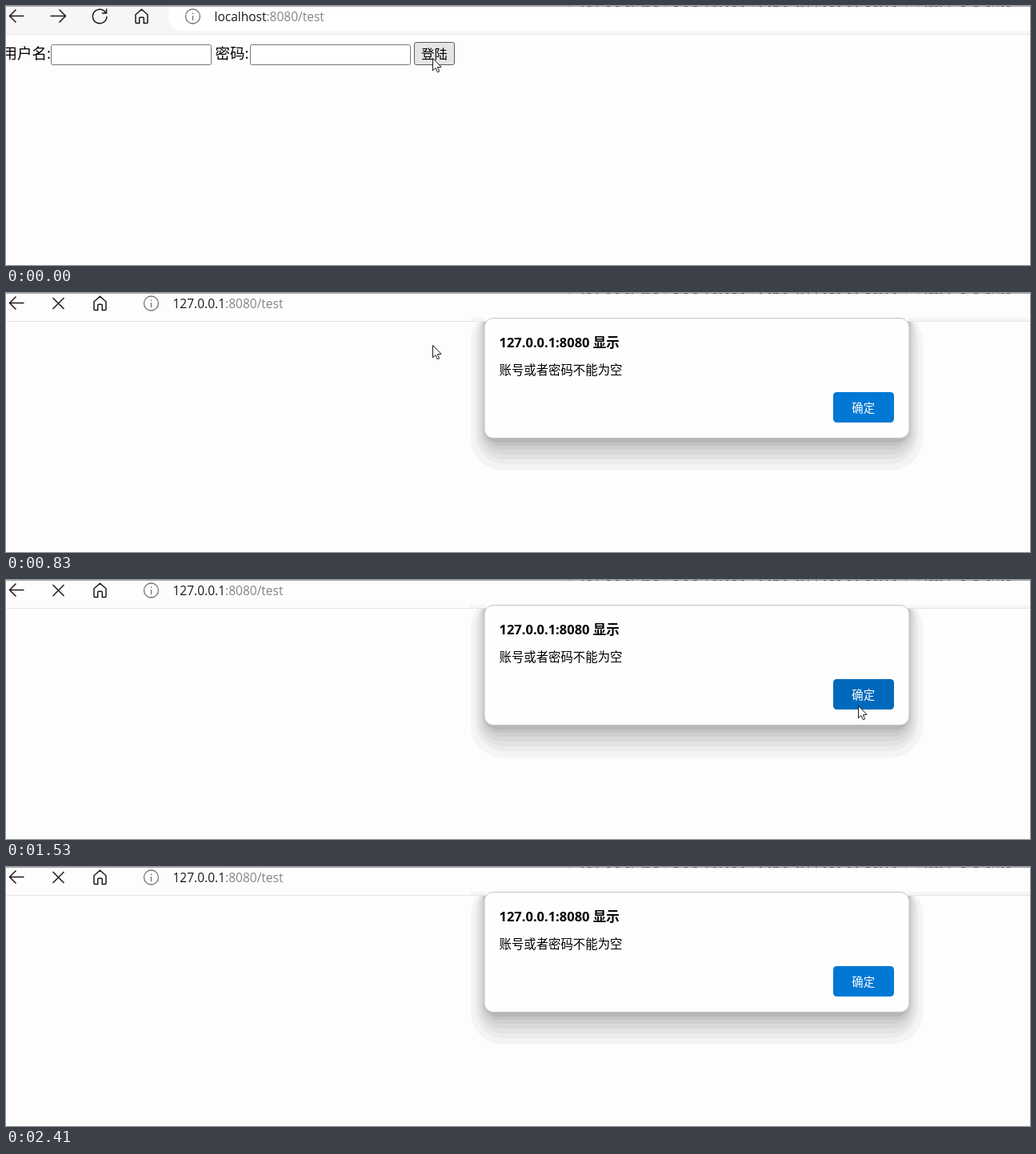
An HTML page for the animation above (2.84 s loop, 1280 by 324 pixels).

```html
<!DOCTYPE html>
<html lang="zh-CN">
<head>
<meta charset="utf-8">
<title>Login test</title>
<style>
html, body { margin: 0; width: 100%; height: 100%; overflow: hidden; background: #fdfdfd; }
svg { display: block; width: 100vw; height: 100vh; }
text { font-family: "Open Sans", "Noto Sans CJK SC", "Noto Sans CJK", sans-serif; white-space: pre; }
.icon { fill: none; stroke: #1b1b1b; stroke-width: 1.5; }
.thin { fill: none; stroke: #727272; stroke-width: 1.3; }
.url { font-size: 15.5px; fill: #858585; }
.url tspan { fill: #1a1a1a; }
.label { font-size: 18.5px; }
.title { font-size: 16.5px; font-weight: 700; }
.message { font-size: 15.4px; }
.ok { font-size: 14.4px; fill: #fff; }
.field { fill: #fff; stroke: #767676; }
</style>
</head>
<body>
<svg viewBox="0 0 1280 324" preserveAspectRatio="none">
  <defs>
    <path id="back" class="icon" d="M22.5 12.5H4.5M12.5 4.5l-8 8 8 8"/>
    <path id="stop" class="icon" d="M-7 -7L7 7M7 -7L-7 7"/>
    <path id="home" class="icon" d="M-7.5 -2.2L0 -8.8L7.5 -2.2V7.5Q7.5 8.5 6.5 8.5H2.8V2.2Q2.8 1.2 1.8 1.2H-1.8Q-2.8 1.2 -2.8 2.2V8.5H-6.5Q-7.5 8.5 -7.5 7.5Z"/>
    <g id="info">
      <circle class="thin" r="9"/>
      <path class="thin" d="M0 -1V5M0 -4.6V-3"/>
    </g>
    <clipPath id="page"><rect y="36" width="1280" height="288"/></clipPath>
    <clipPath id="below"><rect y="31" width="1280" height="293"/></clipPath>
  </defs>

  <rect width="1280" height="324" fill="#fdfdfd"/>

  <g id="login">
    <rect width="1280" height="35" fill="#f6f6f6"/>
    <path d="M1280 0H203V13Q204 31 222 31H1280Z" fill="#fff"/>
    <rect y="35" width="1280" height="1" fill="#e6e6e6"/>
    <path class="icon" d="M55.5 12.5H74.5M66.5 4.5l8 8-8 8"/>
    <path id="reload" class="icon" d="M124.6 8.2A8.8 8.8 0 1 0 126 13M125.6 3.5V9H120"/>
    <use id="cancel" href="#stop" x="117.5" y="13"/>
    <use href="#home" x="169.5" y="13"/>
    <use href="#info" x="233.5" y="13"/>
    <text class="url" x="260.5" y="18.7"><tspan>localhost</tspan>:8080/test</text>
    <text class="label" x="-4.6" y="65.5">用户名:</text>
    <rect class="field" x="56.5" y="48.5" width="200" height="25" rx="2"/>
    <text class="label" x="261.5" y="65.5">密码:</text>
    <rect class="field" x="305.5" y="48.5" width="200" height="25" rx="2"/>
    <rect x="510.5" y="45.5" width="50" height="28" rx="2.5" fill="#e5e5e5" stroke="#5c5c5c"/>
    <text x="519" y="66" font-size="16.4">登陆</text>
  </g>

  <g id="alert">
    <rect x="1128" y="31" width="152" height="4" fill="#f5f5f5"/>
    <rect x="581" y="31" width="18" height="4" fill="#f5f5f5"/>
    <rect y="35" width="1280" height="1" fill="#e6e6e6"/>
    <use href="#stop" x="65.5" y="13"/>
    <use href="#home" x="117.5" y="13"/>
    <use href="#info" x="181.5" y="13"/>
    <text class="url" x="208.5" y="18.7"><tspan>127.0.0.1</tspan>:8080/test</text>

    <g id="rising" clip-path="url(#below)">
      <path d="M597 36Q592 70 592 160Q594 193 632 193H1096Q1133 193 1135 160Q1135 70 1130 36Z" fill="#e8e8e8"/>
      <path d="M597 150Q595 176 613 176H1114Q1133 176 1131 150Z" fill="#d8d8d8"/>
      <path d="M598 31L596 158Q597 171 609 171H1119Q1131 171 1132 158L1128 31Z" fill="#fdfdfd"/>
      <text class="title" x="616.5" y="56" fill="#747474">127.0.0.1:8080 显示</text>
      <text class="message" x="616" y="89.8" fill="#858585">账号或者密码不能为空</text>
      <rect x="1035" y="112" width="76" height="39" rx="4" fill="#78b6e8"/>
      <text class="ok" x="1058.5" y="137">确定</text>
    </g>

    <g id="settled">
      <g id="shadow" clip-path="url(#page)"></g>
      <rect x="598" y="31.5" width="531" height="150" rx="11" fill="#fefefe" stroke="#c4c4c4"/>
      <text class="title" x="616.5" y="68">127.0.0.1:8080 显示</text>
      <text class="message" x="616.5" y="102">账号或者密码不能为空</text>
      <rect id="button" x="1034" y="124" width="76" height="38" rx="4.5"/>
      <text class="ok" x="1057.3" y="148.5">确定</text>
    </g>
  </g>

  <use href="#back"/>
  <rect width="1280" height="1" fill="#a6a6a6"/>
  <g id="specks" fill="#555"></g>
  <path id="cursor" d="M.5 .5V15.8L4 12.6L6.4 17.8L8.7 16.8L6.4 11.7L11 11.3Z" fill="#fff" stroke="#1a1a1a" stroke-linejoin="round"/>
</svg>

<script>
const $ = id => document.getElementById(id);
const show = (id, on) => { $(id).style.display = on ? '' : 'none'; };
const BLUE = '#0078d4', DARK = '#0069bb', LOOP = 2840;

function addRect(parent, attrs) {
  const r = document.createElementNS('http://www.w3.org/2000/svg', 'rect');
  for (const k in attrs) r.setAttribute(k, attrs[k]);
  $(parent).append(r);
}

// Banded shadow: left edge, bottom edge, grey level
[[581, 222, 244], [587, 214, 235], [590, 208, 226], [593, 202, 217],
 [595, 196, 207], [597, 191, 196], [599, 187, 182]].forEach(([x, bottom, g], i) =>
  addRect('shadow', {
    x, y: 20, width: 1727 - 2 * x, height: bottom - 20,
    rx: 40 - i * 4, fill: `rgb(${g},${g},${g})`
  }));

// Remains of the row above the window edge
let seed = 7;
const rand = () => (seed = seed * 16807 % 2147483647) / 2147483647;
for (let x = 704; x < 1252; x += 4 + rand() * 13)
  addRect('specks', { x: Math.round(x), y: 0, width: 1 + Math.round(rand() * 4), height: 1 });

// time, view, cursor x, cursor y, button colour
const steps = [
  [0, 'idle', 533, 65, BLUE],
  [560, 'loading', 533, 65, BLUE],
  [710, 'rising', 533, 65, BLUE],
  [830, 'settled', 533, 65, BLUE],
  [1110, 'settled', 816, 79, BLUE],
  [1260, 'settled', 1075, 145, BLUE],
  [1380, 'settled', 1063, 156, BLUE],
  [1530, 'settled', 1065, 157, DARK],
  [2020, 'settled', 1069, 152, DARK],
  [2170, 'settled', 1095, 186, BLUE],
  [2290, 'settled', 1243, 309, BLUE],
  [2410, 'settled', 1300, 340, BLUE]
];

let last = null;
const start = performance.now();
function draw() {
  const t = (performance.now() - start) % LOOP;
  const step = steps.filter(s => s[0] <= t).pop() || steps[0];
  if (step !== last) {
    last = step;
    const [, view, x, y, colour] = step;
    const open = view === 'rising' || view === 'settled';
    show('login', !open);
    show('alert', open);
    show('reload', view === 'idle');
    show('cancel', view === 'loading');
    show('rising', view === 'rising');
    show('settled', view === 'settled');
    $('button').setAttribute('fill', colour);
    $('cursor').setAttribute('transform', `translate(${x} ${y})`);
  }
  requestAnimationFrame(draw);
}
draw();
</script>
</body>
</html>
```
